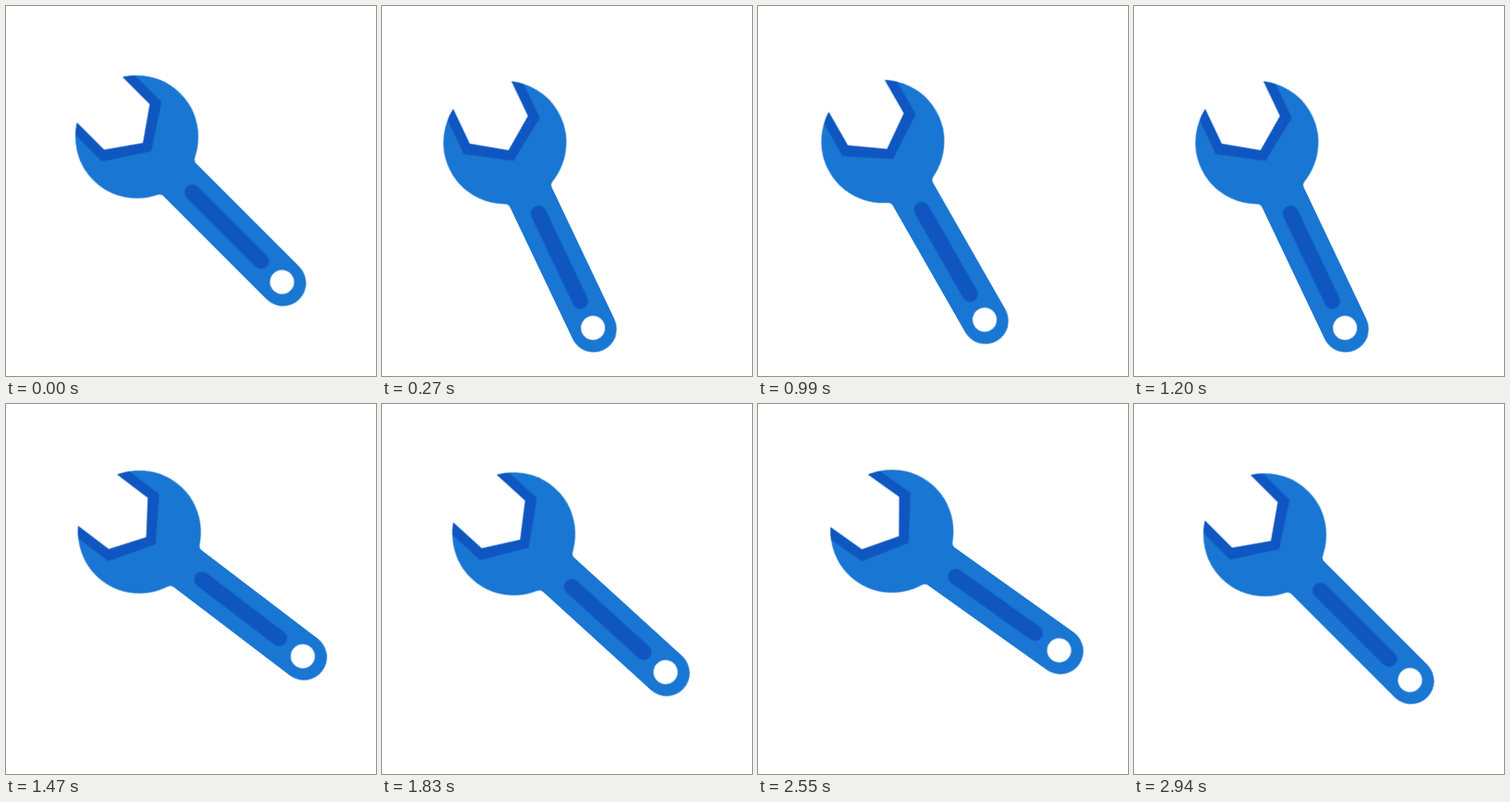
Recreate the animation shown at these times as an HTML page. Size 400 by 400 pixels, loop 3470 ms.

```html
<!DOCTYPE html>
<html lang="en">
<head>
<meta charset="utf-8">
<title>Turning wrench</title>
<style>
  html, body { margin: 0; width: 100%; height: 100%; overflow: hidden; background: #fff; }
  svg { display: block; width: 100vw; height: 100vh; }
  .blue { fill: #1976d2; }
  .dark { fill: #0f56c1; }
  .white { fill: #fff; }
  .slot { stroke: #0f56c1; stroke-width: 17; stroke-linecap: round; }
</style>
</head>
<body>
<svg viewBox="0 0 400 400">
  <defs>
    <clipPath id="head"><circle cx="31.1" cy="0" r="66.5"/></clipPath>
  </defs>
  <!-- origin is the centre of the jaw, x runs along the handle -->
  <g transform="translate(119.5 119.5) rotate(45)">
    <g id="wrench">
      <circle class="blue" cx="31.1" cy="0" r="66.5"/>
      <path class="blue" d="M31 -25H254.5A25 25 0 0 1 254.5 25H31Z"/>
      <path class="blue" d="M90.9 -29Q92.7 -25 97 -25V25Q92.7 25 90.9 29Z"/>
      <path class="dark" clip-path="url(#head)" d="M-40 -45.4H23.3L53 0L23.3 45.4H-40Z"/>
      <path class="white" d="M-42 -34.8H15.9L40.3 0L15.9 34.8H-42Z"/>
      <path class="slot" d="M116 0H221"/>
      <circle class="white" cx="253" cy="0" r="13"/>
    </g>
  </g>
</svg>
<script>
  const LOOP = 3470, STEP = 30, END = 2940;
  const PULL = 'cubic-bezier(.8,0,.35,1)';
  const BACK = 'ease';
  const SETTLE = 'cubic-bezier(.2,.2,.25,1)';

  // time in ms, angle in degrees, easing towards the next row
  const poses = [
    [0, 0, 'ease-in-out'],
    [225, 22.5, BACK],
    [690, -10, PULL],
    [1155, 22.5, BACK],
    [1620, -10, PULL],
    [2085, 22.5, BACK],
    [2535, -10, SETTLE],
    [END, 0, 'linear'],
    [LOOP, 0, 'linear']
  ];

  const swing = document.getElementById('wrench').animate(
    poses.map(([time, angle, easing]) => ({
      offset: time / LOOP,
      transform: `rotate(${angle}deg)`,
      easing
    })),
    { duration: LOOP, fill: 'both' }
  );
  swing.pause();

  const start = performance.now();

  function draw() {
    const time = (performance.now() - start) % LOOP;
    swing.currentTime = Math.min(END, Math.floor(time / STEP) * STEP);
    requestAnimationFrame(draw);
  }
  draw();
</script>
</body>
</html>
```
